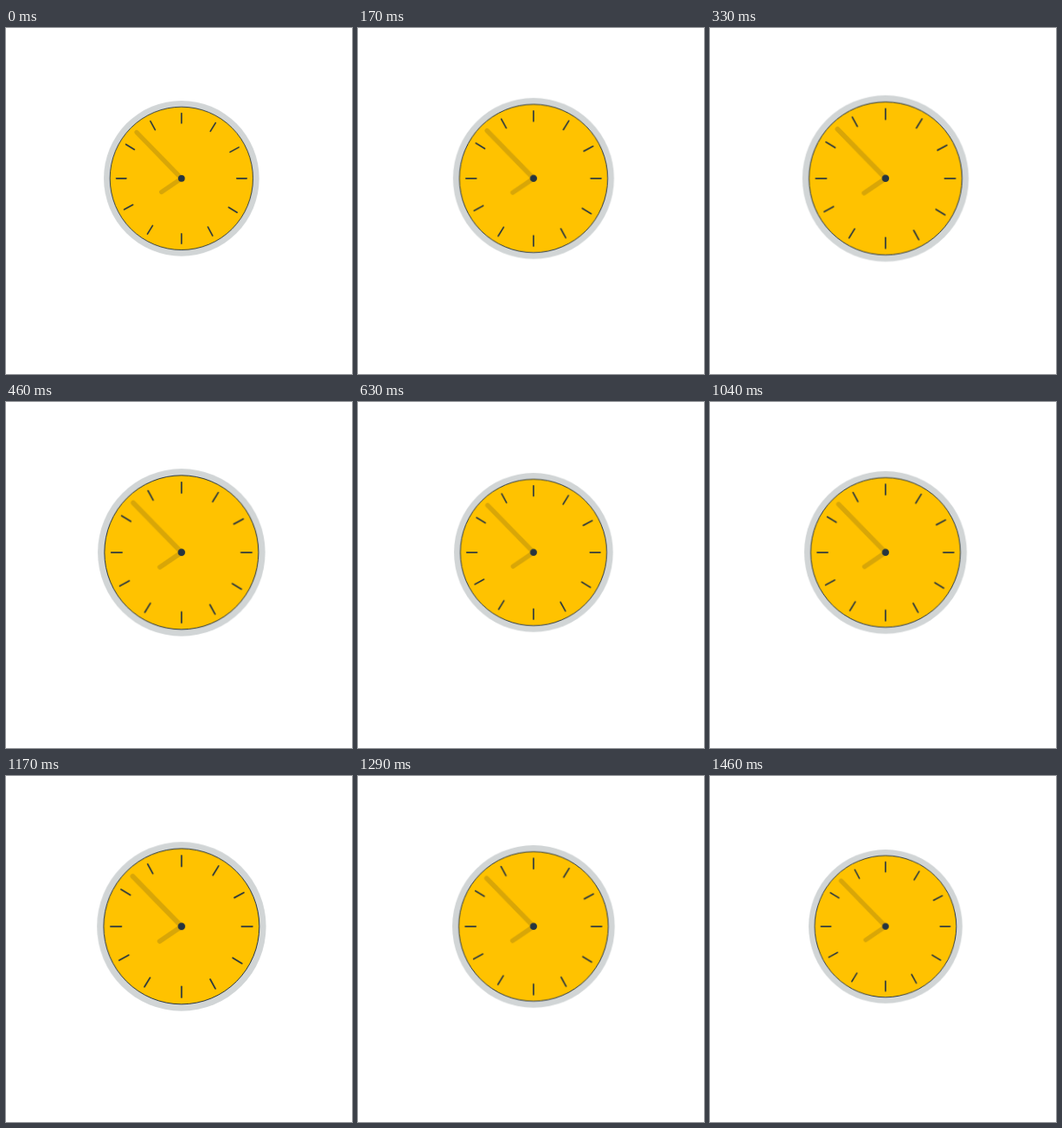
Write an HTML page that moves like this. It is 400 px wide and 400 px high and loops after 1.5 s.

```html
<!DOCTYPE html>
<html lang="en">
<head>
<meta charset="utf-8">
<title>Pulsing clock</title>
<style>
  html, body { margin: 0; width: 100%; height: 100%; overflow: hidden; background: #fff; }
  svg { display: block; width: 100vw; height: 100vh; }
  .clock { animation: pulse 1500ms linear infinite; }
  .ring { fill: #d1d5d6; }
  .face { fill: #ffc200; stroke: #263540; stroke-width: .9; }
  .ticks { stroke: #263540; stroke-width: 1.6; stroke-linecap: round; }
  .hands { fill: none; stroke: #d8a608; stroke-width: 5.2; stroke-linecap: round; stroke-linejoin: round; }
  .hub { fill: #263540; }

  @keyframes pulse {
    0% { transform: scale(.998); }
    22% { transform: scale(1.068); }
    28.3% { transform: scale(1.087); }
    42% { transform: scale(1.022); }
    47.2% { transform: scale(.989); }
    50% { transform: scale(.989); }
    52.7% { transform: scale(.993); }
    69.3% { transform: scale(1.044); }
    77.8% { transform: scale(1.087); }
    86% { transform: scale(1.044); }
    97.3% { transform: scale(.988); }
    100% { transform: scale(.988); }
  }
</style>
</head>
<body>
<svg viewBox="0 0 400 400">
  <g transform="translate(202.9 173.9)">
    <g class="clock">
      <circle class="ring" r="90"/>
      <circle class="face" r="82.8"/>
      <g class="ticks">
        <path id="quarter" d="M0-75.5V-64"/>
        <use href="#quarter" transform="rotate(90)"/>
        <use href="#quarter" transform="rotate(180)"/>
        <use href="#quarter" transform="rotate(270)"/>
        <g id="pair">
          <use href="#quarter" transform="rotate(31.5)"/>
          <use href="#quarter" transform="rotate(61.5)"/>
        </g>
        <use href="#pair" transform="rotate(90)"/>
        <use href="#pair" transform="rotate(180)"/>
        <use href="#pair" transform="rotate(270)"/>
      </g>
      <path class="hands" d="M-52-53.5L0 0L-23.2 15.8"/>
      <circle class="hub" r="3.9"/>
    </g>
  </g>
</svg>
</body>
</html>
```
